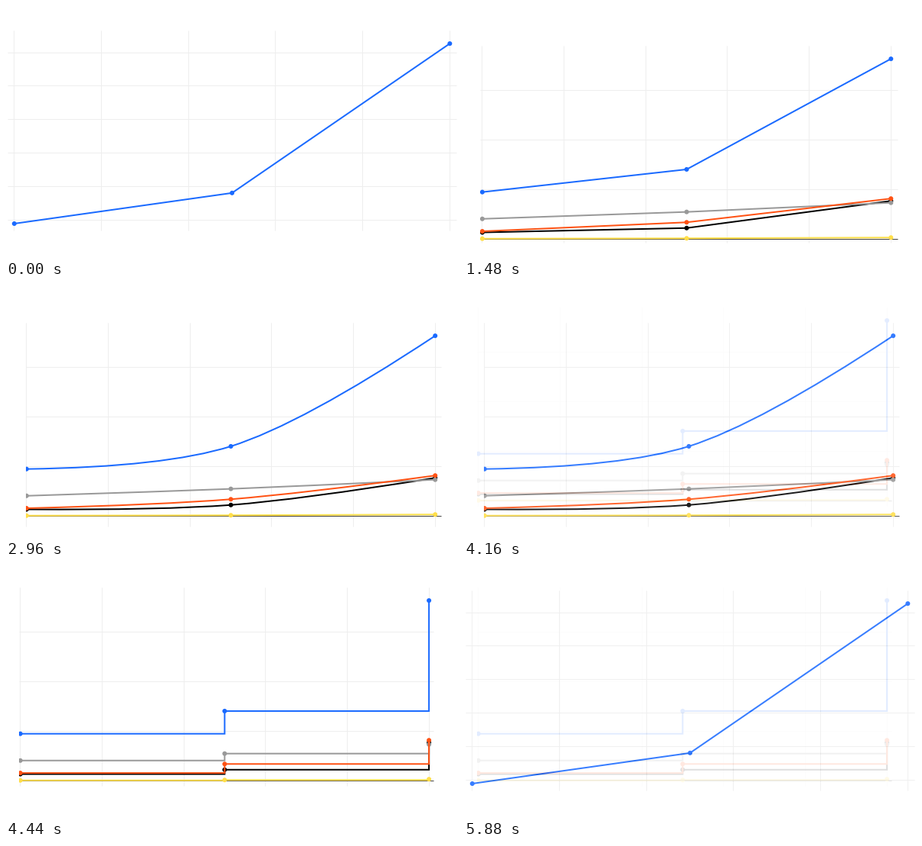
Write a matplotlib script that moves like this. It is 590x330 px and loops after 5.92 s.

```python
import matplotlib.pyplot as plt
import numpy as np
from matplotlib.animation import FuncAnimation
from matplotlib.patches import Circle, PathPatch, Rectangle
from matplotlib.path import Path

WIDTH, HEIGHT, DPI = 590, 330, 100
PX = 72 / DPI
INTERVAL = 40
SCENE_FRAMES, FADE_FRAMES = 37, 7

# Colour and three values per series, in vertical grid units, back to front
SERIES = [
    ("#1a6aff", (1.893, 2.809, 7.27)),
    ("#000000", (0.265, 0.442, 1.535)),
    ("#999999", (0.812, 1.092, 1.462)),
    ("#ff5214", (0.31, 0.673, 1.63)),
    ("#ffde4a", (0.012, 0.027, 0.058)),
]

# box: left, top, right, bottom of the visible plot area
SCENES = [
    dict(box=(2, 32, 588, 294), x0=10.8, dx=113.7, zero=368.0, unit=43.85,
         step=1, shape="linear", count=1),
    dict(box=(21, 52, 566, 310), x0=23.9, dx=106.68, zero=305.1, unit=32.45,
         step=2, shape="linear", count=5),
    dict(box=(26, 48, 568, 315), x0=26.8, dx=106.68, zero=301.1, unit=32.45,
         step=2, shape="spline", count=5),
    dict(box=(17, 28, 558, 288), x0=18.7, dx=106.68, zero=281.1, unit=32.45,
         step=2, shape="step", count=5),
]


def spline_path(points):
    """Two quadratic arcs with a centripetal tangent at the middle point."""
    start, mid, end = points
    back, ahead = start - mid, end - mid
    back_len, ahead_len = np.hypot(*back), np.hypot(*ahead)
    tangent = ahead_len * back - back_len * ahead
    a, b = np.sqrt(back_len), np.sqrt(ahead_len)
    before = mid + tangent / (3 * b * (a + b))
    after = mid - tangent / (3 * a * (a + b))
    codes = [Path.MOVETO] + [Path.CURVE3] * 4
    return Path([start, before, mid, after, end], codes)


def series_path(points, shape):
    if shape == "spline":
        return spline_path(points)
    if shape == "step":
        (x0, y0), (x1, y1), (x2, y2) = points
        return Path([(x0, y0), (x1, y0), (x1, y1), (x2, y1), (x2, y2)])
    return Path(points)


def draw_grid(ax, scene):
    left, top, right, bottom = scene["box"]
    style = dict(lw=PX, solid_capstyle="butt")
    for k in range(6):
        x = int(scene["x0"] + k * scene["dx"])
        ax.plot([x, x], [top, bottom], color="#eeeeee", zorder=1, **style)
    for value in range(0, 9, scene["step"]):
        y = int(scene["zero"] - value * scene["unit"])
        if top < y < bottom:
            color, z = ("#eeeeee", 1) if value else ("#444444", 2)
            ax.plot([left, right], [y, y], color=color, zorder=z, **style)


def draw_series(ax, scene):
    left, top, right, bottom = scene["box"]
    clip = Rectangle((left, top), right - left, bottom - top,
                     transform=ax.transData)
    xs = scene["x0"] + scene["dx"] * np.array([0, 2.5, 5])
    for z, (color, values) in enumerate(SERIES[:scene["count"]], start=3):
        ys = scene["zero"] - scene["unit"] * np.array(values)
        points = np.column_stack([xs, ys])
        line = PathPatch(series_path(points, scene["shape"]), fill=False,
                         ec=color, lw=2 * PX, capstyle="butt",
                         joinstyle="miter", snap=False, zorder=z)
        dots = [Circle(p, 3, fc=color, lw=0, zorder=z + 0.5) for p in points]
        for artist in [line, *dots]:
            ax.add_patch(artist)
            artist.set_clip_path(clip)


def build_scene(scene):
    ax = fig.add_axes([0, 0, 1, 1], facecolor="white", xticks=[], yticks=[])
    ax.spines[:].set_visible(False)
    draw_grid(ax, scene)
    draw_series(ax, scene)
    ax.set(xlim=(0, WIDTH), ylim=(HEIGHT, 0))
    return ax


def fade_filter(alpha):
    """Fade a whole chart, white background included, as one layer."""
    def apply(image, dpi):
        image[..., 3] *= alpha
        return image, 0, 0
    return apply


def update(frame):
    index, local = divmod(frame, SCENE_FRAMES)
    alpha = max(0, local - (SCENE_FRAMES - FADE_FRAMES) + 1) / (FADE_FRAMES + 1)
    for ax in charts:
        ax.set_visible(False)
        ax.set_agg_filter(None)
    current = charts[index]
    current.set_visible(True)
    current.set_zorder(0)
    if alpha:
        upcoming = charts[(index + 1) % len(charts)]
        upcoming.set_visible(True)
        upcoming.set_zorder(1)
        upcoming.set_agg_filter(fade_filter(alpha))
    return charts


fig = plt.figure(figsize=(WIDTH / DPI, HEIGHT / DPI), dpi=DPI, facecolor="white")
charts = [build_scene(scene) for scene in SCENES]
anim = FuncAnimation(fig, update, frames=SCENE_FRAMES * len(SCENES),
                     init_func=lambda: update(0), interval=INTERVAL,
                     repeat=True, repeat_delay=0, blit=False)
plt.show()
```
